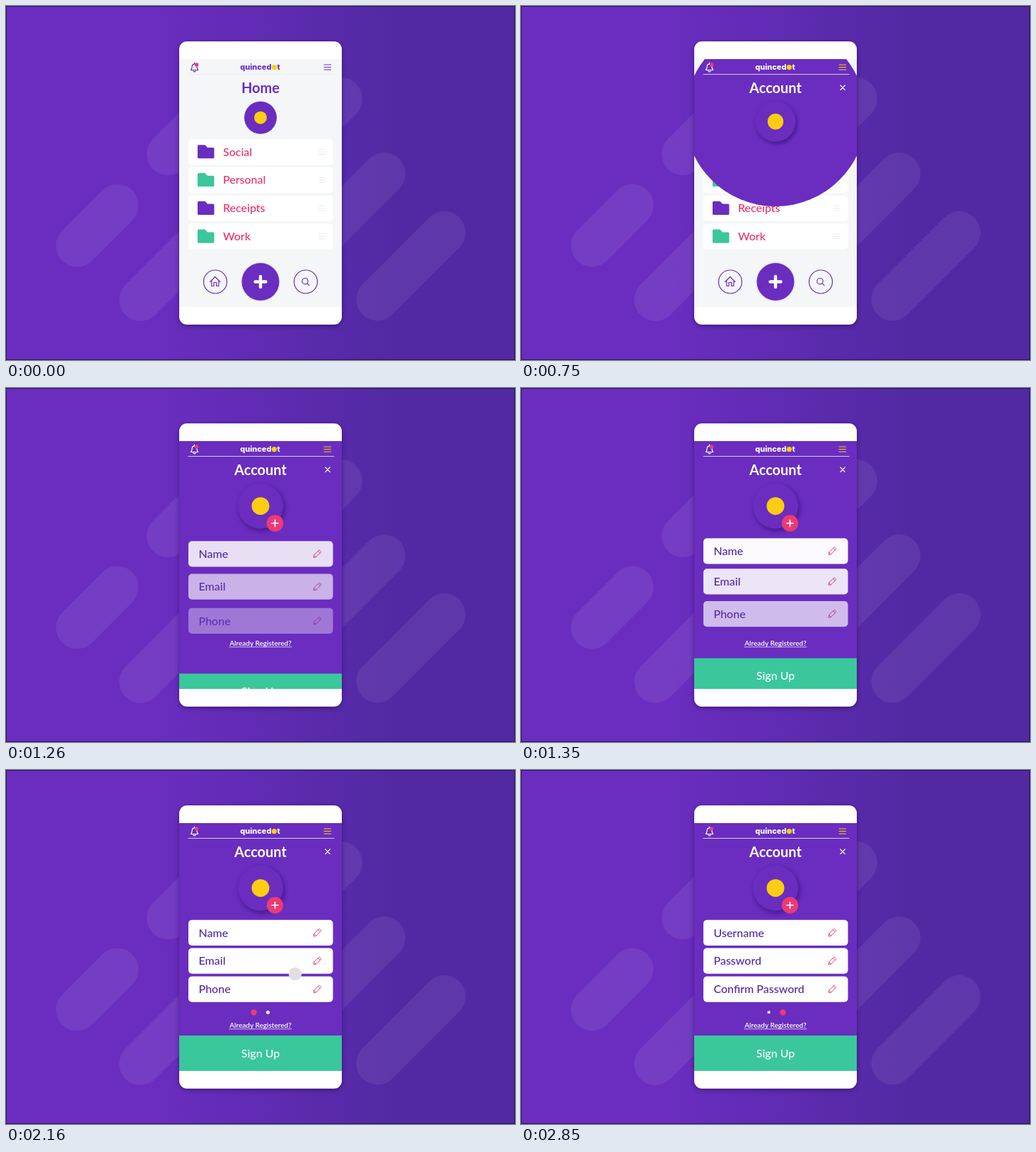
An HTML page for the animation above (3600 ms loop, 720 by 500 pixels).

```html
<!DOCTYPE html>
<html lang="en">
<head>
<meta charset="utf-8">
<title>Account sign-up</title>
<style>
  html, body { margin: 0; width: 100%; height: 100%; overflow: hidden; background: #6a2dbf; }
  svg { display: block; width: 720px; height: 500px; }
  text { font: 500 16px Lato, sans-serif; }
  .title { font-size: 20px; font-weight: 700; text-anchor: middle; }
  .brand { font: 800 11px Inter, sans-serif; }
  .mid { text-anchor: middle; }
  .line { fill: none; stroke-linecap: round; stroke-linejoin: round; }
</style>
</head>
<body>
<svg viewBox="0 0 720 500">
  <defs>
    <linearGradient id="bg">
      <stop offset=".3" stop-color="#6a2dbf"/>
      <stop offset=".76" stop-color="#5229a3"/>
    </linearGradient>
    <filter id="soft" x="-30%" y="-30%" width="160%" height="160%"><feGaussianBlur stdDeviation="3"/></filter>
    <clipPath id="screen"><path d="M245 75h230v350h-230z"/></clipPath>
    <clipPath id="reveal"><circle id="hole" cx="360" cy="155" r="0"/></clipPath>
  </defs>
  <rect width="720" height="500" fill="url(#bg)"/>
  <path class="line" stroke="#fff" stroke-opacity=".07" stroke-width="60"
    d="M100.500 338.500L157.500 281.500M229 209L330 108M190 415L474 131M430 342L535 237M525.500 414.500L620 320"/>
  <rect x=".5" y=".5" width="719" height="499" fill="none" stroke="#1d0d3c" stroke-opacity=".75"/>
  <rect x="245" y="52" width="230" height="400" rx="12" fill="#1d0d3c" opacity=".5" filter="url(#soft)"/>
  <rect x="245" y="50" width="230" height="400" rx="11" fill="#fff"/>
  <g clip-path="url(#screen)">
    <g id="home"></g>
    <g id="account" clip-path="url(#reveal)"></g>
    <g id="avatar">
      <circle id="shade" cx="2" cy="3" r="32" fill="#2a0f66" filter="url(#soft)"/>
      <circle r="32" fill="#6a2dbf"/>
      <circle r="12.500" fill="#fccd12"/>
    </g>
    <g id="add">
      <circle r="11.700" fill="#ec3a75"/>
      <path class="line" d="M-4.500 0h9M0-4.500v9" stroke="#fff" stroke-width="1.700"/>
    </g>
    <circle id="finger" cy="288" r="9.200" fill="#dfdfe4"/>
  </g>
</svg>
<script>
const PURPLE = '#6a2dbf', INK = '#5228a3', PINK = '#ec3a75', GREEN = '#3ac79b', YELLOW = '#fccd12';
const $ = id => document.getElementById(id);
const set = (el, attrs) => { for (const k in attrs) el.setAttribute(k, attrs[k]); };
const line = (d, color, width = 1.2) => `<path class="line" d="${d}" stroke="${color}" stroke-width="${width}"/>`;
const box = (x, y, w, h, fill, rx = 0) => `<rect x="${x}" y="${y}" width="${w}" height="${h}" rx="${rx}" fill="${fill}"/>`;
const label = (x, y, text, fill, cls = '') => `<text x="${x}" y="${y}" fill="${fill}" class="${cls}">${text}</text>`;
const disc = (x, y, r, fill, extra = '') => `<circle cx="${x}" cy="${y}" r="${r}" fill="${fill}" ${extra}/>`;

const header = (ink, bars, rule) =>
  line('M261.500 90.500c2-2 1.300-4 1.900-6.200c.8-3.200 5.600-3.200 6.400 0c.6 2.200-.1 4.200 1.900 6.200zM265 92q1.600 1.500 3.200 0M266.600 80v1.500', ink) +
  disc(269.6, 83, 2.7, PINK) +
  label(375.5, 90, 'quinced', ink, 'brand" text-anchor="end') +
  disc(379.4, 86.6, 3.6, YELLOW) + label(383.4, 90, 't', ink, 'brand') +
  line('M450 83h9.500M450 86.500h9.500M450 90h9.500', bars) +
  line('M258 96.500h206', rule, 1);

const folder = (name, i) => {
  const y = 188 + i * 39.8;
  return box(258, y, 204.5, 36.2, '#fff', 5) +
    `<path d="M272.500 ${y + 8.2}h9l3.500 3.800h8q1.500 0 1.500 1.500v12.300q0 1.500-1.500 1.500h-20.500q-1.500 0-1.500-1.500v-16q0-1.600 1.500-1.600z" fill="${i % 2 ? GREEN : PURPLE}"/>` +
    label(307, y + 23.6, name, '#eb2d70') +
    line([14.5, 18, 21.5].map(d => `M442 ${y + d}h9`).join(''), '#e9ebef', 1);
};

const pencil = y => `<g transform="translate(440 ${y}) rotate(45)">` +
  line('M-2-5.500q0-1 1-1h2q1 0 1 1V4L0 7L-2 4zM-2-4h4M-2 4h4', PINK, .9) + '</g>';

const field = (name, i) => {
  const y = 211.7 + i * 39.9;
  return box(258, y, 204.5, 36.2, '#fff', 5) + label(272.5, y + 23.8, name, INK) + pencil(y + 18.3);
};

$('home').innerHTML = box(245, 75, 230, 350, '#f4f6f8') + header(PURPLE, PURPLE, '#eceef2') +
  label(360, 122.5, 'Home', PURPLE, 'title') +
  ['Social', 'Personal', 'Receipts', 'Work'].map(folder).join('') +
  disc(296, 389.5, 16.5, 'none', `stroke="${PURPLE}" stroke-width="1.200"`) +
  line('M288.800 389.500l7-7l7 7M290.800 388v7.500h3.200v-5h3.700v5h3.200v-7.500', PURPLE) +
  disc(360, 389.5, 28.2, '#e8e6f0') + disc(360, 389.5, 26.5, PURPLE) +
  line('M352.500 389.500h15M360 382v15', '#fff', 4.4) +
  disc(424, 389.5, 16.5, 'none', `stroke="${PURPLE}" stroke-width="1.200"`) +
  disc(423, 388.7, 4.2, 'none', `stroke="${PURPLE}" stroke-width="1.200"`) + line('M426.200 391.900l2.800 2.800', PURPLE);

$('account').innerHTML = box(245, 75, 230, 350, PURPLE) + header('#fff', YELLOW, '#d9caf0') +
  label(360, 122.5, 'Account', '#fff', 'title') + line('M451.700 112l6.600 6.600m0-6.600l-6.600 6.600', '#fff') +
  '<g id="pages">' + ['Name', 'Email', 'Phone'].map((n, i) => `<g id="field${i}">${field(n, i)}</g>`).join('') +
  '<g transform="translate(223)">' + ['Username', 'Password', 'Confirm Password'].map(field).join('') + '</g></g>' +
  '<g id="dots"><rect id="dot0"/><rect id="dot1"/></g>' +
  '<g id="already">' + label(360, 364, 'Already Registered?', '#fff', 'mid" style="font-size:10px;font-weight:600') +
  line('M316 365.800h88', '#fff', .7) + '</g>' +
  '<g id="signup">' + box(245, 375, 230, 50, GREEN) + label(360, 405.6, 'Sign Up', '#fff', 'mid') + '</g>';

const span = (t, from, to) => Math.min(1, Math.max(0, (t - from) / (to - from)));
const ease = (t, from, to) => {
  const p = span(t, from, to);
  return p < .5 ? 2 * p * p : 1 - 2 * (1 - p) ** 2;
};
const mix = (a, b, p) => a + (b - a) * p;

// on = 1: large pink dot, on = 0: small white one
function drawDot(el, x, on, smallSize, smallRound) {
  const size = mix(smallSize, 8.4, on);
  const rgb = [236, 58, 117].map(c => Math.round(mix(255, c, on)));
  set(el, { x: x - size / 2, y: 342.2 - size / 2, width: size, height: size,
    rx: size / 2 * mix(smallRound, 1, on), fill: `rgb(${rgb})` });
}

function draw(t) {
  // avatar grows with its top edge held in place
  const r = 23 + 2 * span(t, 60, 570) ** 2 + 7 * ease(t, 600, 900);
  set($('avatar'), { transform: `translate(360 ${134.7 + r}) scale(${r / 32})` });
  set($('shade'), { opacity: .65 * span(t, 600, 750) });
  set($('hole'), { r: t < 600 ? 0 : mix(25, 318, ease(t, 600, 960)) });

  const pop = 1.26 * ease(t, 930, 1110) - .26 * ease(t, 1110, 1290);
  set($('add'), { transform: `translate(380.500 191) scale(${pop})` });

  for (let i = 0; i < 3; i++) {
    const p = ease(t, 900 + 75 * i, 1400 + 75 * i);
    set($('field' + i), { transform: `translate(0 ${30 * (1 - p)})`, opacity: p });
  }
  set($('already'), { opacity: ease(t, 850, 1080) });
  set($('signup'), { transform: `translate(0 ${50 * (1 - ease(t, 1110, 1435))})` });
  set($('dots'), { opacity: ease(t, 1550, 1950) });

  set($('pages'), { transform: `translate(${-223 * ease(t, 2190, 2770)})` });
  const swap = ease(t, 2300, 2540);
  drawDot($('dot0'), 350.6, 1 - swap, 3.6, 0);
  drawDot($('dot1'), 370.5, swap, 5, 1);
  set($('finger'), { cx: mix(409, 289, ease(t, 2180, 2550)), opacity: t < 2160 ? 0 : 1 - span(t, 2560, 2700) });
}

function tick(now) {
  draw(now % 3600);
  requestAnimationFrame(tick);
}
draw(0);
requestAnimationFrame(tick);
</script>
</body>
</html>
```
